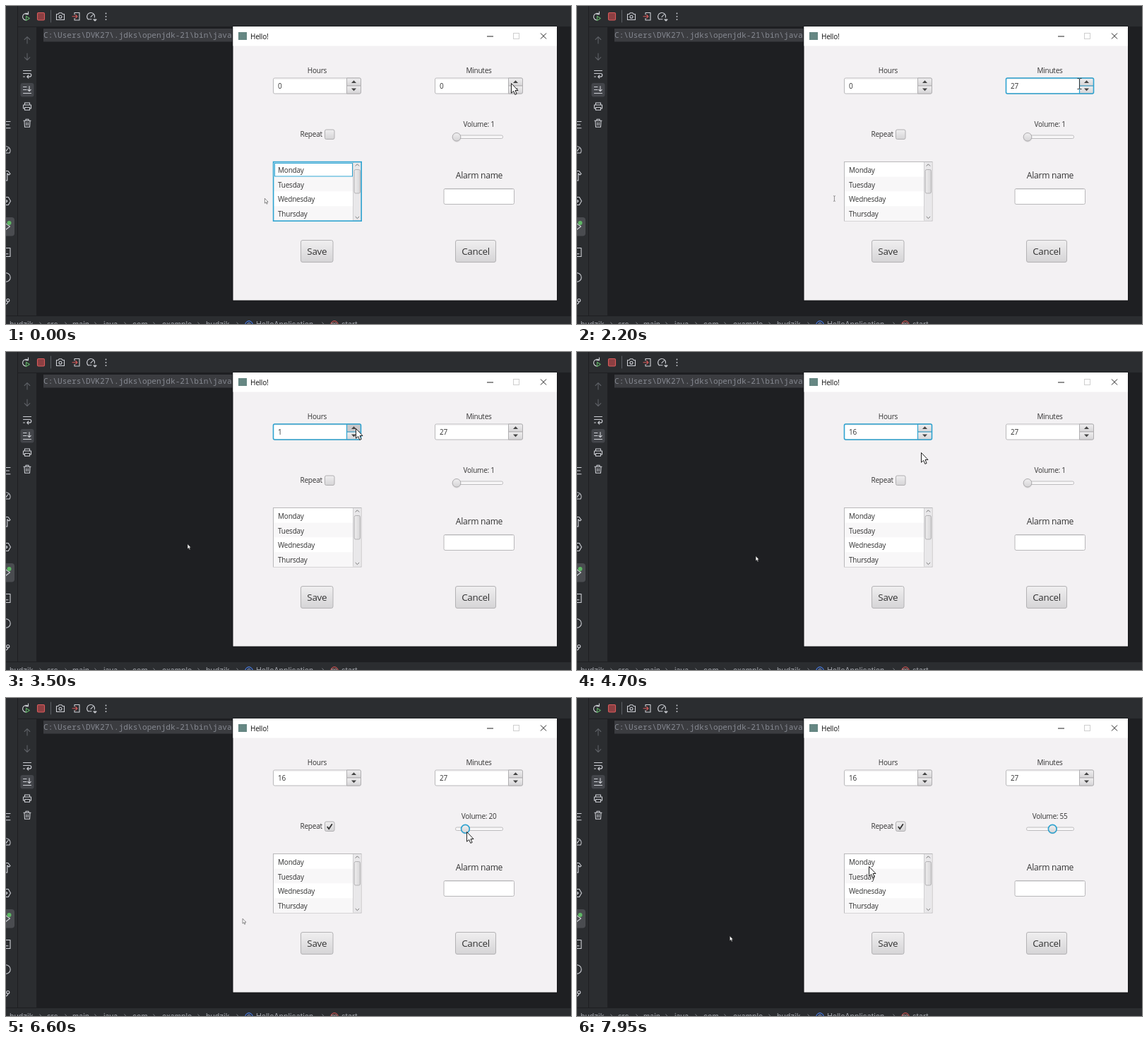
An HTML page that plays this animation: 800 px wide and 450 px high, repeating every 8 s.

```html
<!DOCTYPE html>
<html lang="en">
<head>
<meta charset="utf-8">
<title>Alarm form</title>
<style>
html, body { margin: 0; width: 100%; height: 100%; overflow: hidden; background: #1e1f22; }
svg { display: block; width: 100vw; height: 100vh; }
text { font-family: "Open Sans", "Noto Sans", sans-serif; font-size: 10px; letter-spacing: -.022em; fill: #333; }
.mid { text-anchor: middle; }
.mono { font-family: "Noto Sans Mono", "DejaVu Sans Mono", monospace; font-size: 11.12px; letter-spacing: 0; fill: #858890; white-space: pre; }
.crumb text { font-family: Inter, sans-serif; font-size: 10.6px; letter-spacing: 0; fill: #a3a6ac; }
.icon { fill: none; stroke: #ced0d6; stroke-width: 1.1; stroke-linecap: round; stroke-linejoin: round; }
.dim { stroke: #5d6066; }
.red { stroke: #db5c5c; }
.box { fill: #fff; stroke: #b9b8ba; }
.blue { fill: none; stroke: #2fa4d1; stroke-width: 1.6; }
</style>
</head>
<body>
<svg viewBox="0 0 800 450" preserveAspectRatio="none">
  <defs>
    <linearGradient id="face" x2="0" y2="1">
      <stop offset="0" stop-color="#f0eff0"/><stop offset="1" stop-color="#d5d4d6"/>
    </linearGradient>
    <linearGradient id="bar"><stop offset="0" stop-color="#efeeef"/><stop offset="1" stop-color="#d6d5d7"/></linearGradient>
    <path id="arrow" d="M.5 .5V14.2L3.7 11.4L5.8 16.4L8.1 15.4L6 10.5H10Z" fill="#fff" stroke="#222"/>
    <path id="beam" d="M-2.5 -7.5H-.8L.5 -6.7L1.8 -7.5H3.5M.5 -6.7V6.7M-2.5 7.5H-.8L.5 6.7L1.8 7.5H3.5" fill="none" stroke="#333"/>
  </defs>

  <!-- editor -->
  <path fill="#2b2d30" d="M0 0H800V29H43V438H800V450H0Z"/>
  <path fill="none" stroke="#1e1f22" d="M16.5 0V438M17 29.5H800M0 438.5H800"/>
  <rect x="53" y="32" width="268" height="18.5" fill="#3b3c40"/>
  <text class="mono" x="53" y="45">C:\Users\DVK27\.jdks\openjdk-21\bin\java</text>

  <g class="icon">
    <path d="M31 11.2A4.8 4.8 0 1 0 28 20M31.5 8V11.7H27.8"/>
    <path d="M28.5 14.5V20.5L33.3 17.5Z" stroke="#5fad65"/>
    <rect x="44.5" y="9.5" width="10" height="10.5" rx="1.5" fill="#8c3f42" class="red"/>
    <path class="dim" d="M63.5 6V23" stroke-width="1"/>
    <path d="M71.5 11.5H74L75.2 9.7H78.8L80 11.5H82.5V19.5H71.5Z"/><circle cx="77" cy="15.3" r="2"/>
    <path d="M97 12V9.5H104V20H97V17.5"/><path class="red" d="M94 14.8H101M98.7 12.5L101 14.8L98.7 17.1"/>
    <path d="M116.3 18.8A5.4 5.4 0 1 1 125.3 16.2M120 15.7L122.8 12.5M116.3 18.8H121M124 19H128L126 21Z"/>
    <path d="M141.5 10.5V10.6M141.5 14.8V14.9M141.5 19.1V19.2" stroke-width="1.8"/>

    <path class="dim" d="M30 53V44M26.2 47.5L30 43.7L33.8 47.5M30 67V76M26.2 72.7L30 76.5L33.8 72.7"/>
    <path d="M24.5 91.5H35.5M24.5 95.5H33.5A2.3 2.3 0 0 1 33.5 100.1H30M31.8 98L29.7 100.1L31.8 102.2M24.5 100H26.5"/>
    <rect x="20.5" y="109" width="19" height="19.5" rx="3" fill="#43454a" stroke="none"/>
    <path d="M24.5 114.5H29M24.5 118.5H29M24.5 123.5H35.5M33 113.5V120.5M30.8 118.3L33 120.5L35.2 118.3"/>
    <path d="M26.5 140V137H33.5V140M26.5 145H24.5V140H35.5V145H33.5M26.5 143.5H33.5V147.3H26.5Z"/>
    <path d="M25 162.2H35M28 162V160.2H32V162M26 162.5L26.5 171.2H33.5L34 162.5M28.8 164.8V168.8M31.2 164.8V168.8"/>

    <path d="M-1 163.5H6M-1 168H4.5M-1 172.7H6"/>
    <path d="M5 208A6 6 0 1 0 -5 208H5M0 205.5L3 201.5"/>
    <path d="M-3 233.5H3L6 237.5L4 239L1.8 236.8V247H-1"/>
    <path d="M0 270.5H3.3L6.5 276L3.3 281.5H0M-1 274L2 276L-1 278.5"/>
    <rect x="-8" y="299" width="20" height="26.5" rx="4" fill="#4a4c50" stroke="none"/>
    <path d="M-1 307.5L5.5 312L-1 317"/>
    <circle cx="4.5" cy="307" r="3" fill="#5fb865" stroke="none"/>
    <path d="M-2 342.5H6V354.5H-2M0 350.7H3"/>
    <circle cx="0" cy="384" r="6.2"/>
    <circle cx="2.8" cy="416.5" r="2"/><path d="M2.8 418.5C2.8 422 0 421 -1 423"/>
  </g>

  <g class="crumb" id="crumbs">
    <circle cx="344" cy="451" r="5.3" fill="#25324d" stroke="#548af7"/>
    <circle cx="465" cy="451" r="5.3" fill="#402929" stroke="#db5c5c"/>
    <text class="mid" x="344" y="454">c</text><text class="mid" x="465" y="454">m</text>
  </g>

  <!-- window -->
  <rect x="320.5" y="28.5" width="460" height="389" fill="#111214"/>
  <rect x="321.5" y="29" width="458.5" height="387.5" fill="#f3f1f3"/>
  <rect x="321.5" y="29" width="458.5" height="27.5" fill="#fff"/>
  <rect x="329" y="37" width="12" height="11" fill="#668783"/>
  <text x="346" y="46.7" style="fill:#111">Hello!</text>
  <path d="M681 43H690M757 38.5L765 46.5M765 38.5L757 46.5" stroke="#222" fill="none"/>
  <rect x="718.5" y="38.5" width="8" height="8" fill="none" stroke="#cfcfcf"/>

  <text class="mid" x="440.5" y="95">Hours</text>
  <text class="mid" x="669.5" y="95">Minutes</text>
  <g id="spinners"></g>

  <text x="416.5" y="185.3">Repeat</text>
  <rect x="451.5" y="175" width="13.5" height="13.5" rx="2" fill="url(#face)" stroke="#b0afb1"/>
  <rect id="checkRing" class="blue" x="451.3" y="174.8" width="13.8" height="13.8" rx="2.5"/>
  <path id="check" d="M454.8 182L457.2 185.2L461.8 178.3" fill="none" stroke="#333" stroke-width="1.8"/>

  <text id="volume" class="mid" x="669.7" y="170.5"></text>
  <rect x="636.5" y="183" width="67" height="4.5" rx="2" fill="#f8f7f8" stroke="#bdbcbe"/>
  <g id="thumb">
    <circle cy="1" r="6.4" fill="#000" opacity=".08"/>
    <circle r="5.8" fill="url(#face)" stroke="#acabad"/>
    <circle id="thumbRing" class="blue" r="5.9"/>
  </g>

  <rect class="box" x="378.5" y="220.5" width="124.5" height="83.5"/>
  <g id="days"></g>
  <rect x="491.5" y="221" width="11" height="82.5" fill="#e9e8ea"/>
  <path d="M491.5 221V303.5" stroke="#d0cfd1"/>
  <rect x="493.2" y="231.5" width="8.3" height="33.5" rx="2" fill="url(#bar)" stroke="#b3b2b4"/>
  <path d="M494.7 226.5L497.4 223.8L500.1 226.5M494.7 298L497.4 300.7L500.1 298" fill="none" stroke="#777"/>
  <g id="listRing" class="blue">
    <rect x="378.6" y="220.6" width="124.6" height="83.6"/>
    <rect x="380.5" y="222.5" width="110" height="18.5" stroke-width="1"/>
  </g>

  <text class="mid" x="670" y="243.8" style="font-size:12.1px">Alarm name</text>
  <rect class="box" x="620" y="258.5" width="99.5" height="22" rx="2"/>
  <path d="M621.5 259.5H718.5" stroke="#e4e3e5"/>
  <g id="buttons"></g>

  <use id="pointer"/>
  <use id="ghost"/>
</svg>
<script>
const LOOP = 8000, STEP = 50;
const $ = id => document.getElementById(id);

// When each control takes the focus, and when the spinner presses run.
const FOCUS = [[0, 'list'], [250, 'minutes'], [3230, 'hours'], [5150, 'repeat'], [6150, 'volume']];
const DRAG = [6150, 7150];
const PATH = [
  [0, 715, 109], [2100, 715, 109], [2200, 711, 110], [2230, 711, 110],
  [2700, 511, 108], [2850, 511, 108], [3150, 495, 108], [4370, 495, 108],
  [4700, 487, 142], [5000, 457, 180], [5220, 457, 180], [5700, 574, 190],
  [5950, 632, 183], [6180, 639, 184], [6600, 652, 189], [7080, 675, 189],
  [7170, 675, 189], [7650, 373, 257], [7950, 413, 238], [8000, 413, 238]
];

function spinner(id, x) {
  const tri = (y, d) => `<path d="M${x + 110.5} ${y}h7l-3.5 ${d}z" fill="#444"/>`;
  return `<rect class="box" x="${x}" y="102" width="124" height="22" rx="2"/>
    <path d="M${x + 1.5} 103H${x + 103}" stroke="#e4e3e5"/>
    <path id="${id}Up" d="M${x + 104} 102h18a2 2 0 0 1 2 2v9h-20z" fill="url(#face)" stroke="#b0afb1"/>
    <path d="M${x + 104} 113h20v9a2 2 0 0 1 -2 2h-18z" fill="url(#face)" stroke="#b0afb1"/>
    ${tri(109, -3.8)}${tri(116.5, 3.8)}
    <g id="${id}Ring" class="blue"><rect x="${x}" y="102" width="124" height="22" rx="2"/>
    <path d="M${x + 104} 102V124M${x + 104} 113H${x + 124}" stroke-width="1.2"/></g>
    <text id="${id}" x="${x + 6.5}" y="116.7"></text>`;
}

function button(label, x, w) {
  return `<rect x="${x}" y="331.5" width="${w}" height="31" rx="2.5" fill="url(#face)" stroke="#b3b2b4"/>
    <text class="mid" x="${x + w / 2}" y="351.8" style="font-size:13.4px">${label}</text>`;
}

$('spinners').innerHTML = spinner('hours', 378.5) + spinner('minutes', 607.5);
$('buttons').innerHTML = button('Save', 417.5, 45.5) + button('Cancel', 636.5, 57);
$('days').innerHTML = ['Monday', 'Tuesday', 'Wednesday', 'Thursday'].map((day, i) => {
  const y = 221 + i * 20.75;
  return `<rect x="379" y="${y}" width="112.5" height="20.75" fill="${i % 2 ? '#f8f7f8' : '#fff'}"/>
    <text x="385" y="${y + 14.8}">${day}</text>`;
}).join('');

const crumbs = [['budzik', 5], ['src', 58], ['main', 94], ['java', 138], ['com', 179],
  ['example', 221], ['budzik', 283], ['HelloApplication', 354], ['start', 475]];
$('crumbs').insertAdjacentHTML('beforeend',
  crumbs.map(([name, x]) => `<text x="${x}" y="454.3">${name}</text>`).join('') +
  [49, 85, 127, 169, 210, 273, 328, 449].map(x =>
    `<path d="M${x - 1.5} 447.5l3 3.3l-3 3.3" fill="none" stroke="#7f8288"/>`).join(''));

// Smooth path through the points, at rest wherever it pauses.
function slope(i, k) {
  const a = PATH[i - 1], b = PATH[i], c = PATH[i + 1];
  if (!a || !c) return 0;
  const before = (b[k] - a[k]) / (b[0] - a[0]), after = (c[k] - b[k]) / (c[0] - b[0]);
  return before * after <= 0 ? 0 : 2 * before * after / (before + after);
}

function along(t, k) {
  let i = 0;
  while (i < PATH.length - 2 && t >= PATH[i + 1][0]) i++;
  const a = PATH[i], b = PATH[i + 1], d = b[0] - a[0], u = (t - a[0]) / d, w = 1 - u;
  return w * w * (1 + 2 * u) * a[k] + u * u * (3 - 2 * u) * b[k]
    + d * u * w * (w * slope(i, k) - u * slope(i + 1, k));
}

// A held spinner counts once, waits 300 ms, then repeats every 60 ms.
function held(t, start, max) {
  if (t < start) return 0;
  return Math.min(max, t < start + 300 ? 1 : 2 + Math.floor((t - start - 300) / 60));
}

function volumeAt(t) {
  if (t < DRAG[0]) return 1;
  const x = along(Math.min(t, DRAG[1]), 1);
  return Math.max(1, Math.round(1 + (x - 639.5) / .653));
}

const show = (id, on) => $(id).setAttribute('visibility', on ? 'visible' : 'hidden');
const press = (id, on) => $(id).setAttribute('fill', on ? '#c9c8ca' : 'url(#face)');

function place(id, shape, x, y, scale) {
  $(id).setAttribute('href', '#' + shape);
  $(id).setAttribute('transform', `translate(${x} ${y}) scale(${scale})`);
}

function draw(t) {
  const focus = FOCUS.filter(f => t >= f[0]).pop()[1];
  show('listRing', focus === 'list');
  show('minutesRing', focus === 'minutes');
  show('hoursRing', focus === 'hours');
  show('checkRing', focus === 'repeat');
  show('thumbRing', focus === 'volume');
  show('check', t >= 5200);

  $('minutes').textContent = held(t, 250, 27);
  $('hours').textContent = held(t, 3230, 16);
  press('minutesUp', t >= 250 && t < 2080);
  press('hoursUp', t >= 3230 && t < 4390);

  const volume = volumeAt(t);
  $('volume').textContent = 'Volume: ' + volume;
  $('thumb').setAttribute('transform', `translate(${638 + (volume - 1) * .653} 185.3)`);

  const x = along(t, 1), y = along(t, 2);
  const overField = y > 101 && y < 125 && (x > 607 && x < 712 || x > 378 && x < 483);
  const shape = overField ? 'beam' : 'arrow';
  place('pointer', shape, x, y, 1);
  place('ghost', shape, .497 * x + 10.8, .5 * y + 217.5, .5);
}

const begin = performance.now();
function tick() {
  const t = (performance.now() - begin) % LOOP;
  draw(Math.floor(t / STEP) * STEP);
  requestAnimationFrame(tick);
}
tick();
</script>
</body>
</html>
```
